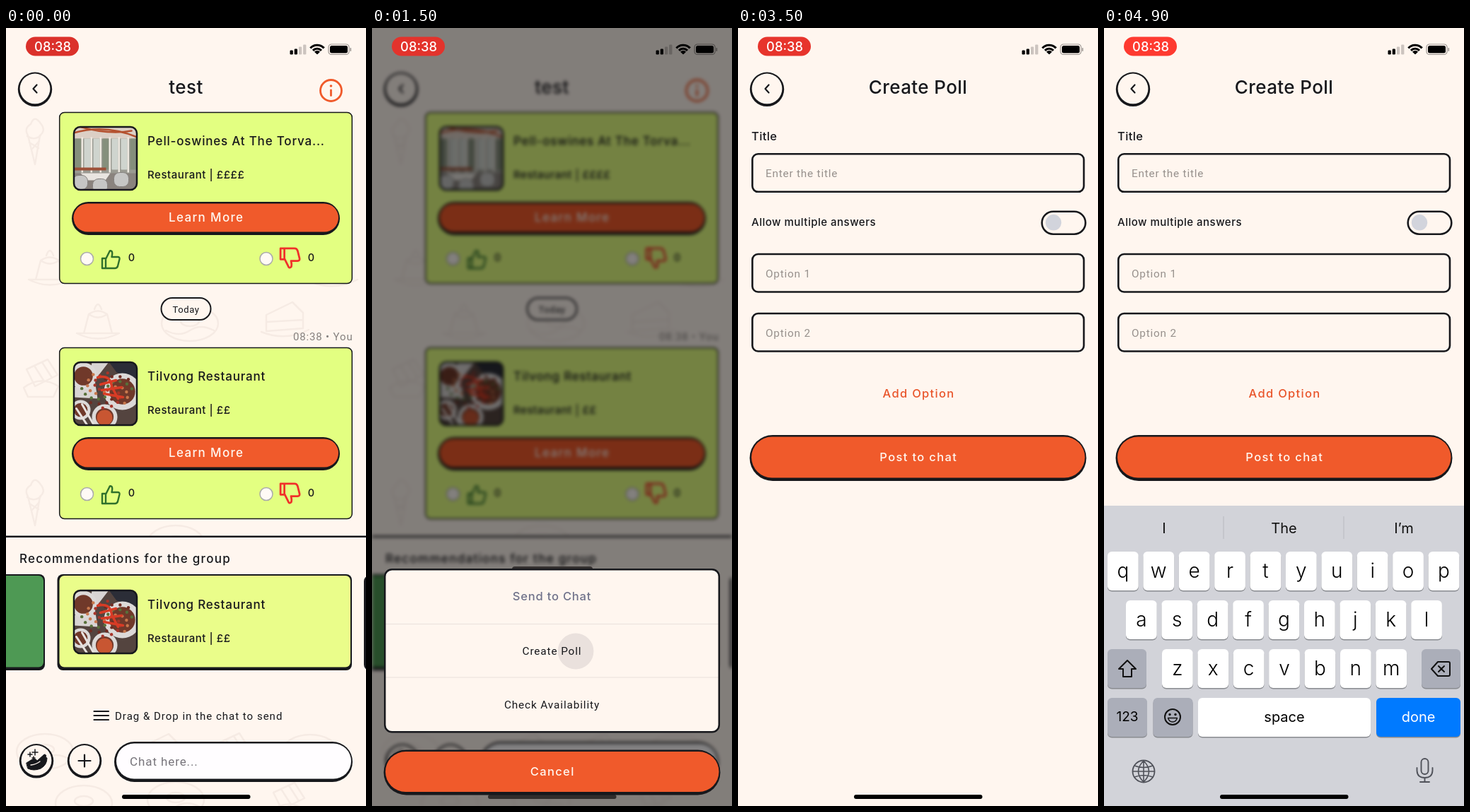
Animation of 509 by 1101 pixels, one loop 5 s. Source, as an HTML page with a canvas:

```html
<!DOCTYPE html>
<html lang="en">
<head>
<meta charset="utf-8">
<title>Create a poll</title>
<style>
  html, body { margin: 0; width: 509px; height: 1101px; overflow: hidden; background: #fff6ef; }
  canvas { display: block; }
</style>
</head>
<body>
<canvas id="stage" width="509" height="1101"></canvas>
<script>
const W = 509, H = 1101, LOOP = 5000;
const CREAM = '#fff6ef', INK = '#17181c', ORANGE = '#f05a2b', LIME = '#e3ff81', DOODLE = '#f6ebe4';
const screen = document.getElementById('stage').getContext('2d');
let c = screen;

const clamp = v => Math.max(0, Math.min(1, v));
const span = (t, start, length) => clamp((t - start) / length);
const easeOut = (u, power) => 1 - (1 - u) ** power;

function box(x, y, w, h, r, fill, stroke, width = 2.5) {
  c.beginPath();
  c.roundRect(x, y, w, h, r);
  if (fill) { c.fillStyle = fill; c.fill(); }
  if (stroke) { c.strokeStyle = stroke; c.lineWidth = width; c.stroke(); }
}

function disc(x, y, r, fill, stroke, width = 2) {
  box(x - r, y - r, 2 * r, 2 * r, r, fill, stroke, width);
}

function path(d, stroke, width = 2, fill) {
  const p = new Path2D(d);
  c.lineCap = c.lineJoin = 'round';
  if (fill) { c.fillStyle = fill; c.fill(p); }
  if (stroke) { c.strokeStyle = stroke; c.lineWidth = width; c.stroke(p); }
}

function label(str, x, y, size, { color = INK, weight = 500, gap = 0, align = 'left', face = 'Inter' } = {}) {
  c.font = `${weight} ${size}px ${face}, sans-serif`;
  c.letterSpacing = gap + 'px';
  c.textAlign = align;
  c.fillStyle = color;
  c.fillText(str, x, y);
}

const roboto = (str, x, y, size, options) =>
  label(str, x, y, size, { face: 'Roboto', weight: 400, gap: .9, ...options });

function at(x, y, draw, alpha = 1) {
  c.save();
  c.translate(x, y);
  c.globalAlpha *= alpha;
  draw();
  c.restore();
}

function raisedButton(x, y, w, h, str, size) {
  box(x, y, w, h, h / 2, INK);
  box(x + 2.5, y + 2.5, w - 4.5, h - 7, h / 2 - 3.5, ORANGE);
  label(str, x + w / 2 + .7, y + h / 2 - 1.5 + size * .36, size, { color: CREAM, gap: 1.35, align: 'center' });
}

function roundButton(x, y) {
  disc(x, y + .3, 24.2, INK);
  disc(x, y - .6, 21.4, CREAM);
}

function backButton() {
  roundButton(41, 86.5);
  path('M43.5 80.5L38.5 86L43.5 91.5', INK, 2.2);
}

function infoIcon() {
  disc(459.5, 88.5, 15, null, ORANGE, 2.8);
  disc(459.5, 82, 1.8, ORANGE);
  path('M459.5 88V95.5', ORANGE, 2.8);
}

const pageTitle = str => label(str, 254.5, 93, 26, { align: 'center', gap: .4 });

function dining() {
  box(0, 0, 90, 90, 0, '#9a9a92');
  box(0, 0, 90, 17, 0, '#dccfc5');
  path('M0 9Q45 -4 90 15M8 0Q50 12 82 6', '#b4512f', 2.5);
  for (let i = 0; i < 7; i++) {
    box(2 + i * 13, 17, 9, 44, 1, i % 3 ? '#cfd4ce' : '#858f7c');
    box(11 + i * 13, 15, 2.5, 50, 0, '#eee9e1');
  }
  box(0, 58, 46, 4, 0, '#9d5038');
  box(0, 66, 90, 24, 0, '#8a837e');
  path('M10 66H52L45 76H20Z', null, 0, '#e9e5e0');
  [[8, 74], [36, 79], [66, 70]].forEach(([x, y]) => box(x - 9, y - 5, 21, 20, 8, '#c6c6c5', '#85817f', 1));
}

function feast() {
  box(0, 0, 90, 90, 0, '#54443f');
  path('M50 0H90V24L61 15Z', null, 0, '#2b2d37');
  path('M26 0L50 0L30 26L34 52L0 50V36Q24 32 26 0Z', null, 0, '#d8d4d3');
  [[14, 20, 19], [69, 42, 26], [10, 68, 14], [44, 78, 18]].forEach(([x, y, r]) => {
    disc(x, y, r, '#dcd9d8');
    disc(x, y, r * .7, '#70392a');
  });
  for (let i = 0; i < 42; i++) {
    const a = i * 2.4, r = 3.7 * Math.sqrt(i);
    disc(48 + r * Math.cos(a) * 1.6, 40 + r * Math.sin(a) * 1.1, 2.2, ['#a7352a', '#c8784d', '#58713a', '#702b22'][i % 4]);
  }
  path('M34 22Q52 17 54 35L63 52M38 32L60 26M40 40L68 36M43 45L70 50', '#d83b25', 3.5);
  disc(44, 79, 11, '#c85632');
  path('M12 60L28 88M4 66L21 92', '#e8e2df', 3);
}

function photo(x, y, draw) {
  at(x, y, () => {
    c.beginPath();
    c.roundRect(0, 0, 90, 90, 9);
    c.clip();
    draw();
  });
  box(x + .5, y + .5, 89, 89, 9, null, INK, 2.5);
}

const THUMB = 'M1 12H6V26H1ZM6 13L11 3Q12 0 14.5 2Q16 4 14.5 10H23Q26 10 25.5 13L23 23Q22 26 19 26H6';

function votes() {
  [114.5, 368].forEach(x => disc(x, 206.5, 9, '#fffaf5', '#aaa', 1.5));
  at(135, 194, () => path(THUMB, '#2f702c', 2.4));
  at(387, 220.5, () => { c.scale(1.1, -1.1); path(THUMB, '#f0302a', 2.5); });
  [177.5, 431.5].forEach(x => label('0', x, 210, 14.5, { align: 'center' }));
}

function placeInfo(title, price, draw) {
  photo(95.5, 19.5, draw);
  label(title, 200, 46, 17, { gap: .8 });
  label('Restaurant | ' + price, 200, 92.5, 15, { gap: .55 });
}

function messageCard(y, ...place) {
  at(0, y, () => {
    box(75.7, -.5, 413.6, 242, 7, LIME, INK, 1.5);
    placeInfo(...place);
    raisedButton(93, 126, 379, 47, 'Learn More', 17);
    votes();
  });
}

const CONE = 'M-9 -8Q-15 -18 -5 -24Q0 -38 9 -25Q17 -15 8 -8L1 33ZM-10 -7Q0 0 9 -8M-7 2L6 10M7 0L-4 12';
const PUDDING = 'M-20 18L-13 -9Q0 -18 13 -9L20 18ZM-13 -9Q0 0 13 -9M-5 -16Q0 -30 5 -16M-30 18Q0 33 30 18Z';
const DONUT = 'M-40 0A40 25 0 1 0 40 0A40 25 0 1 0 -40 0M-13 -3A13 7 0 1 0 13 -3A13 7 0 1 0 -13 -3M-34 10Q-15 20 0 10T34 10';
const CAKE = 'M-27 -5L10 -23L25 -8V14L-27 18ZM-27 5L25 2M-34 19Q0 33 33 16';
const WAFFLE = 'M-20 -12L10 -26L24 -4L-8 12ZM-24 14Q0 -4 25 12L18 27H-18ZM-9 -17L5 5M2 -22L16 0';

function doodles(list) {
  list.forEach(([d, x, y]) => at(x, y, () => path(d, DOODLE, 2.5)));
}

function hands() {
  path('M29 1040L37 1035Q42 1033 44 1037L54 1028Q58 1028 56 1032L58 1033Q58 1043 49 1048Q39 1052 31 1048Z', INK, 1, INK);
  path('M35 1043Q43 1042 48 1038', CREAM, 1.3);
  [[34, 1028, 3], [41, 1025, 4], [39, 1033, 2]].forEach(([x, y, r]) =>
    path(`M${x} ${y - r}V${y + r}M${x - r} ${y}H${x + r}`, INK, 1.5));
}

function home() {
  box(0, 0, W, H, 0, CREAM);
  doodles([[CONE, 40, 160], [CONE, 40, 671], [PUDDING, 62, 338], [PUDDING, 130, 414], [DONUT, 260, 418],
    [CAKE, 395, 411], [WAFFLE, 49, 495], [CAKE, 464, 340], [DONUT, 240, 729]]);
  pageTitle('test');
  backButton();
  infoIcon();
  messageCard(120, 'Pell-oswines At The Torva...', '££££', dining);
  box(219.5, 382, 70, 31, 15.5, CREAM, INK, 2);
  roboto('Today', 254.5, 402.5, 13, { align: 'center', gap: .6 });
  roboto('08:38 • You', 490.5, 442, 15, { align: 'right', gap: .85, color: '#85817f' });
  messageCard(453, 'Tilvong Restaurant', '££', feast);

  box(0, 719, W, H, 0, CREAM);
  doodles([[DONUT, 55, 1024], [CAKE, 220, 1022], [WAFFLE, 320, 1024], [DONUT, 430, 1025],
    [DONUT, 110, 1097], [DONUT, 240, 1092], [WAFFLE, 398, 1094]]);
  box(0, 718.5, W, 2.5, 0, INK);
  label('Recommendations for the group', 19, 756.5, 17, { gap: 1.3 });
  box(-20, 773, 75, 136, 8, INK);
  box(-20, 775, 73, 129.5, 7, '#4e9954');
  box(72.5, 773, 416.5, 136, 8, INK);
  box(75.5, 775, 411.5, 129.5, 7, '#eafd8a');
  box(506, 775, 30, 134, 8, INK);
  at(0, 776, () => placeInfo('Tilvong Restaurant', '££', feast));
  path('M124.5 967H145M124.5 973H145M124.5 979H145', INK, 2.2);
  roboto('Drag & Drop in the chat to send', 154, 979, 15, { gap: 1 });
  roundButton(43, 1037);
  hands();
  roundButton(111, 1037);
  path('M102.5 1037H119.5M111 1028.5V1045.5', INK, 2.2);
  box(153, 1010, 337, 57, 28.5, INK);
  box(156, 1012.5, 332, 50, 25, '#fffdff');
  roboto('Chat here...', 175, 1044, 17, { color: '#77747b' });
}

function render(draw, filter) {
  const layer = new OffscreenCanvas(W, H), outer = c;
  c = layer.getContext('2d');
  if (filter) { c.fillStyle = CREAM; c.fillRect(0, 0, W, H); c.filter = filter; }
  draw();
  c = outer;
  return layer;
}

let sharpHome, softHome;
function prepare() {
  sharpHome = render(home);
  softHome = render(() => c.drawImage(sharpHome, 0, 0), 'blur(2.6px)');
}

function sheet(drop, ripple) {
  at(0, 766 + drop, () => {
    box(198, -4, 114, 8, 4, '#34302f');
    box(18, 0, 473, 230.5, 10, CREAM);
    if (ripple > 0) {
      c.save();
      c.beginPath();
      c.rect(19, 77.5, 471, 75.5);
      c.clip();
      disc(288, 116, 200 * ripple, 'rgba(30,20,40,.09)');
      c.restore();
    }
    box(18, 77, 473, 1, 0, '#e9e1dc');
    box(18, 152.5, 473, 1, 0, '#e9e1dc');
    box(18.2, .3, 472.6, 230, 10, null, INK);
    label('Send to Chat', 254.5, 43.5, 16.5, { color: '#70728a', gap: .8, align: 'center' });
    roboto('Create Poll', 254.5, 120.5, 15.3, { align: 'center' });
    roboto('Check Availability', 254.5, 197, 15.3, { align: 'center' });
    raisedButton(16.5, 255.5, 476, 64, 'Cancel', 16.5);
  });
}

function field(y, hint) {
  box(20.3, y, 468.7, 53.5, 8, null, INK, 2.6);
  roboto(hint, 39, y + 33, 15.3, { color: '#96908c', gap: .8 });
}

function pollForm() {
  box(0, 0, W, H, 0, CREAM);
  label('Title', 19, 158.5, 16.5, { gap: .4 });
  field(178.3, 'Enter the title');
  label('Allow multiple answers', 19, 279.5, 15, { gap: .5 });
  box(429.7, 259.7, 61.6, 32, 16, null, INK, 2.6);
  disc(446, 275.3, 11.2, '#d2d4dc');
  field(320, 'Option 1');
  field(404, 'Option 2');
  label('Add Option', 255.5, 523, 16.5, { color: '#e9552b', gap: 1.3, align: 'center' });
  raisedButton(16.5, 576, 476, 65, 'Post to chat', 16.5);
}

function movingHeader(u, p) {
  box(0, 0, W, 113, 0, CREAM);
  const leaving = clamp(1 - u / .35), arriving = clamp((u - .35) / .5);
  at(0, 0, backButton, Math.max(leaving, arriving));
  at(0, 0, () => label('te...', 229, 94, 26, { gap: .5 }), leaving);
  at((1 - p) * 640, 0, () => pageTitle('Create Poll'), clamp((u - .27) / .5));
  at(0, 0, infoIcon, clamp(1 - u / .5));
}

function key(x, y, w, str, { fill = '#fff', size = 28, weight = 300, color = '#000' } = {}) {
  box(x, y + 1.5, w, 55, 6, '#898b90');
  box(x, y, w, 55, 6, fill);
  if (str) label(str, x + w / 2, y + 27 + size * .34, size, { weight, color, align: 'center' });
}

function keyboard(drop) {
  const grey = '#abaeb9', plain = { size: 20, weight: 400 };
  at(0, 676 + drop, () => {
    box(0, 0, W, 480, 0, '#d2d3d9');
    ['I', 'The', 'I’m'].forEach((word, i) =>
      label(word, 85 + i * 169.5, 38.5, 20, { weight: 400, align: 'center', color: '#111' }));
    box(168.5, 15, 1, 32, 0, '#b7b9c0');
    box(338.5, 15, 1, 32, 0, '#b7b9c0');
    [['qwertyuiop', 5, 65], ['asdfghjkl', 31, 134], ['zxcvbnm', 82, 203]].forEach(([row, x, y]) =>
      [...row].forEach((letter, i) => key(x + i * 50.4, y, 43.7, letter)));
    key(5, 203, 55, '', { fill: grey });
    key(449, 203, 55, '', { fill: grey });
    path('M33 219L45 231H39V242H27V231H21Z', '#111', 2);
    path('M472 221H487Q489 221 489 223V239Q489 241 487 241H472L463 231ZM473 227L481 235M481 227L473 235', '#111', 2);
    key(5, 272, 56, '123', { ...plain, fill: grey, size: 19 });
    key(69.5, 272, 56, '', { fill: grey });
    disc(97, 299, 11, null, '#111', 2);
    disc(93, 295.5, 1.7, '#111');
    disc(101, 295.5, 1.7, '#111');
    path('M90.5 300.5H103.5Q102 306 97 306T90.5 300.5Z', '#111', 1.3);
    key(133, 272, 244, 'space', plain);
    key(385, 272, 119, 'done', { ...plain, fill: '#007aff', color: '#fff' });
    at(56, 376, () => {
      disc(0, 0, 15.5, null, '#50525a', 1.8);
      path('M-15 0H15M0 -15V15M-13 -8Q0 -3 13 -8M-13 8Q0 3 13 8M0 -15Q-15 0 0 15M0 -15Q15 0 0 15', '#50525a', 1.6);
    });
    box(448.5, 358, 10, 22, 5, null, '#50525a', 1.9);
    path('M442.5 371V375Q443 385 453.5 385T464.5 375V371M453.5 385V391M447 391H460', '#50525a', 1.9);
  });
}

function statusBar(t) {
  const glow = .5 - .5 * Math.cos((t + 200) / 2080 * 2 * Math.PI);
  box(28, 12.5, 75, 27, 13.5, `rgb(${215 + 40 * glow},${48 + 10 * glow},${42 + 6 * glow})`);
  label('08:38', 66, 32.7, 18.3, { color: '#fff', align: 'center' });
  [6, 8, 11, 14].forEach((h, i) => box(401.5 + i * 6.2, 37.5 - h, 4.3, h, 1.2, i < 2 ? '#000' : 'rgba(0,0,0,.2)'));
  c.lineCap = 'butt';
  [3, 8.2, 13.2].forEach((r, i) => {
    c.beginPath();
    c.arc(440, 37.5, r, -Math.PI * .76, -Math.PI * .24);
    c.strokeStyle = '#000';
    c.lineWidth = i ? 3.1 : 5;
    c.stroke();
  });
  box(456, 23, 29, 14.5, 4.3, null, 'rgba(0,0,0,.4)', 1.2);
  box(458, 25, 25, 10.5, 2.5, '#000');
  box(486.5, 28, 1.6, 5, 1, 'rgba(0,0,0,.4)');
}

function homeScene(t, slide) {
  const open = easeOut(span(t, 730, 170), 3);
  const close = span(t, 1650, 500) ** 2;
  const shown = open * (1 - close);
  at(-160 * slide, 0, () => {
    c.drawImage(sharpHome, 0, 0);
    if (shown > 0) at(0, 0, () => c.drawImage(softHome, 0, 0), clamp(shown * 1.5));
  });
  if (shown <= 0) return;
  box(0, 0, W, H, 0, `rgba(0,0,0,${.49 * shown})`);
  box(164, 1085, 181.5, 6, 3, '#302d2c');
  sheet(335 * (1 - shown), easeOut(span(t, 1480, 320), 2));
}

function draw(t) {
  const u = span(t, 1650, 500), slide = easeOut(u, 3.6);
  c.clearRect(0, 0, W, H);
  if (u < 1) homeScene(t, slide);
  if (u > 0) {
    at(W * (1 - slide), 0, pollForm);
    if (u < 1) movingHeader(u, slide);
    else { backButton(); pageTitle('Create Poll'); }
  }
  const caret = span(t, 4010, 110) * (1 - span(t, 4770, 100));
  if (caret > 0) box(38.8, 189.5, 2.3, 27.5, 1, `rgba(233,85,43,${.85 * caret})`);
  const rise = span(t, 3900, 400);
  if (rise > 0) keyboard(425 * (1 - rise) ** 3);
  statusBar(t);
  if (t < 730 || u > 0) box(164, 1085, 181.5, 6, 3, '#000');
}

prepare();
function tick(now) {
  draw(now % LOOP);
  requestAnimationFrame(tick);
}
requestAnimationFrame(tick);
</script>
</body>
</html>
```
